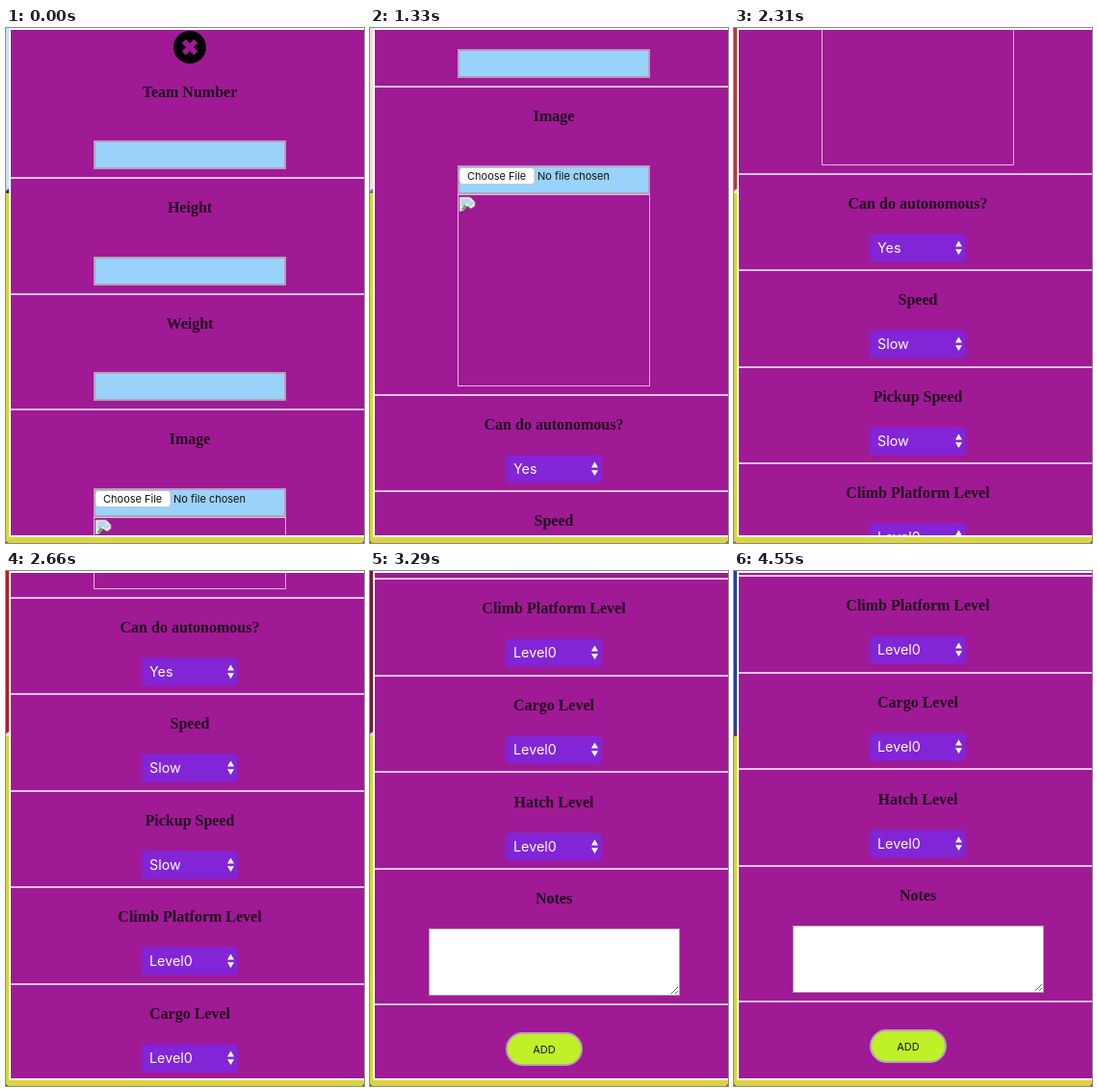
An HTML page for the animation above (4.62 s loop, 372 px wide and 536 px high).

```html
<!DOCTYPE html>
<html lang="en">
<head>
<meta charset="utf-8">
<title>Team form</title>
<style>
html, body { margin: 0; width: 100%; height: 100%; overflow: hidden; background: #fff; }
svg { display: block; width: 372px; height: 536px; }
.label { font: bold 16px "Liberation Serif", "Times New Roman", serif; fill: #22041f; text-anchor: middle; }
.small { font: 11px Inter, sans-serif; fill: #111; }
.choice { font: 14.3px Inter, sans-serif; fill: #fff; }
</style>
</head>
<body>
<svg viewBox="0 0 372 536" xmlns="http://www.w3.org/2000/svg">
  <defs>
    <clipPath id="view"><rect x="5" y="2" width="367" height="526"/></clipPath>
    <filter id="glow" x="-10%" y="-30%" width="120%" height="160%"><feGaussianBlur stdDeviation="1.6"/></filter>
  </defs>
  <rect width="372" height="536" fill="#fff"/>
  <rect id="strip" width="3" height="172"/>
  <path d="M0 172H3V530H372V536H0Z" fill="#dad440"/>
  <path id="corner" d="M0 172V169.5Q1 168 3 167.5V172Z"/>
  <path d="M0 533.5V536H2.5Q.6 535.4 0 533.5ZM372 533.5V536H369.5Q371.4 535.4 372 533.5Z" fill="#55583c"/>
  <rect x="5" y="2" width="367" height="526" fill="#a01a95"/>
  <g clip-path="url(#view)"><g id="page"></g></g>
</svg>
<script>
const LOOP = 4620, STEP = 70;
const $ = id => document.getElementById(id);
const page = $('page');

function add(tag, attrs, text) {
  const el = document.createElementNS('http://www.w3.org/2000/svg', tag);
  for (const key in attrs) el.setAttribute(key, attrs[key]);
  if (text) el.textContent = text;
  page.appendChild(el);
}
const box = (x, y, width, height, fill, more) => add('rect', { x, y, width, height, fill, ...more });
const path = (d, fill, more) => add('path', { d, fill, ...more });
const write = (cls, x, y, text, more) => add('text', { class: cls, x, y, ...more }, text);
const label = (y, text) => write('label', 191, y + 5, text);
const rule = y => box(5, y - 0.8, 367, 1.7, '#f2dff1');
const field = y => box(92, y + 1, 198, 28, '#99d3fb', { stroke: '#b5a0bd', 'stroke-width': 2 });

function select(y, text) {
  box(141, y - 14.5, 99.5, 29, '#8a20c0', { rx: 4, filter: 'url(#glow)' });
  box(141.5, y - 14, 98.5, 28, '#8225d7', { rx: 3 });
  write('choice', 149, y + 5.2, text);
  path(`M230 ${y - 1.5}L233.5 ${y - 7.5}L237 ${y - 1.5}ZM230 ${y + 1.2}H237L233.5 ${y + 7}Z`, '#fff');
}

// Close button
add('circle', { cx: 191, cy: 20, r: 17, fill: '#050005' });
path('M184.8 13.8L197.2 26.2M197.2 13.8L184.8 26.2', 'none', { stroke: '#a01a95', 'stroke-width': 5.6 });

[156, 277, 397, 718, 818, 919, 1019, 1120, 1220, 1321, 1462, 1543].forEach(rule);

[[67, 'Team Number'], [187, 'Height'], [308, 'Weight'], [428, 'Image']].forEach(([y, text]) => {
  label(y, text);
  field(y + (y === 67 || y === 308 ? 50 : 51));
});

// File picker and empty preview
box(93, 481.5, 78, 17, '#fff', { rx: 3.5, stroke: '#b7b9c0', 'stroke-width': 0.7 });
write('small', 101, 494, 'Choose File');
write('small', 174, 494, 'No file chosen');
box(91.5, 509.5, 199, 199, 'none', { stroke: '#dfbddd' });
path('M93 512H104L109 517V521L105 524L101 521L97 526L93 527Z', '#f4f4f4', { stroke: '#999', 'stroke-width': 0.8 });
path('M94.5 513.5H103V518H107V520L105 522L101 519L94.5 522Z', '#bcd3ef');
path('M94.5 525L98 519.5L100.5 521.5L97 525.5Z', '#5fae50');
path('M104 512V517H109Z', '#fff', { stroke: '#999', 'stroke-width': 0.7 });

[[749, 'Can do autonomous?', 'Yes'], [849, 'Speed', 'Slow'], [950, 'Pickup Speed', 'Slow'],
 [1050, 'Climb Platform Level', 'Level0'], [1151, 'Cargo Level', 'Level0'], [1252, 'Hatch Level', 'Level0']
].forEach(([y, text, value]) => { label(y, text); select(y + 46, value); });

label(1352, 'Notes');
box(61.5, 1383.5, 260, 69, '#fff', { stroke: '#a9a0ab' });
path('M313 1451L320 1444M317 1451L320 1448', 'none', { stroke: '#666', 'stroke-width': 1 });
box(142, 1492, 78, 33, '#bff028', { rx: 16.5, stroke: '#b3a3b6', 'stroke-width': 2 });
write('small', 181, 1513, 'ADD', { 'text-anchor': 'middle' });

// Time, value; slopes are limited so each swipe eases without wobble
const scroll = [[0, 0], [910, 0], [1120, 150], [1330, 336], [1680, 500], [2030, 553], [2310, 566],
  [2450, 568], [2660, 690], [2940, 896], [3150, 985], [3360, 1016], [3780, 1015], [4060, 1014], [LOOP, 1014]];
const stripTint = [[0, [205, 224, 247]], [770, [252, 248, 252]], [1330, [250, 217, 222]],
  [2310, [203, 48, 58]], [2940, [170, 12, 24]], [3780, [78, 34, 88]], [4550, [36, 66, 166]], [LOOP, [36, 70, 170]]];
const cornerTint = [[0, [42, 58, 110]], [770, [44, 90, 160]], [1330, [112, 112, 184]],
  [2310, [240, 236, 244]], [2940, [250, 232, 236]], [3780, [190, 170, 200]], [4550, [150, 30, 50]], [LOOP, [150, 30, 50]]];

function segment(keys, t) {
  let i = 0;
  while (i < keys.length - 2 && t >= keys[i + 1][0]) i++;
  return i;
}
function slope(keys, i) {
  if (!i || i === keys.length - 1) return 0;
  const rate = k => (keys[k + 1][1] - keys[k][1]) / (keys[k + 1][0] - keys[k][0]);
  const a = rate(i - 1), b = rate(i);
  return a * b > 0 ? 2 * a * b / (a + b) : 0;
}
function smooth(keys, t) {
  const i = segment(keys, t), [t0, a] = keys[i], [t1, b] = keys[i + 1];
  const d = t1 - t0, u = (t - t0) / d, v = 1 - u;
  return a * v * v * (1 + 2 * u) + b * u * u * (3 - 2 * u)
    + d * u * v * (v * slope(keys, i) - u * slope(keys, i + 1));
}
function tint(keys, t) {
  const i = segment(keys, t), [t0, a] = keys[i], [t1, b] = keys[i + 1];
  const u = (t - t0) / (t1 - t0);
  return `rgb(${a.map((c, k) => Math.round(c + (b[k] - c) * u))})`;
}

function draw(now) {
  const t = Math.floor((now % LOOP) / STEP) * STEP;
  page.setAttribute('transform', `translate(0 ${-Math.round(smooth(scroll, t))})`);
  $('strip').setAttribute('fill', tint(stripTint, t));
  $('corner').setAttribute('fill', tint(cornerTint, t));
}
const start = performance.now();
function tick() {
  draw(performance.now() - start);
  requestAnimationFrame(tick);
}
tick();
</script>
</body>
</html>
```
